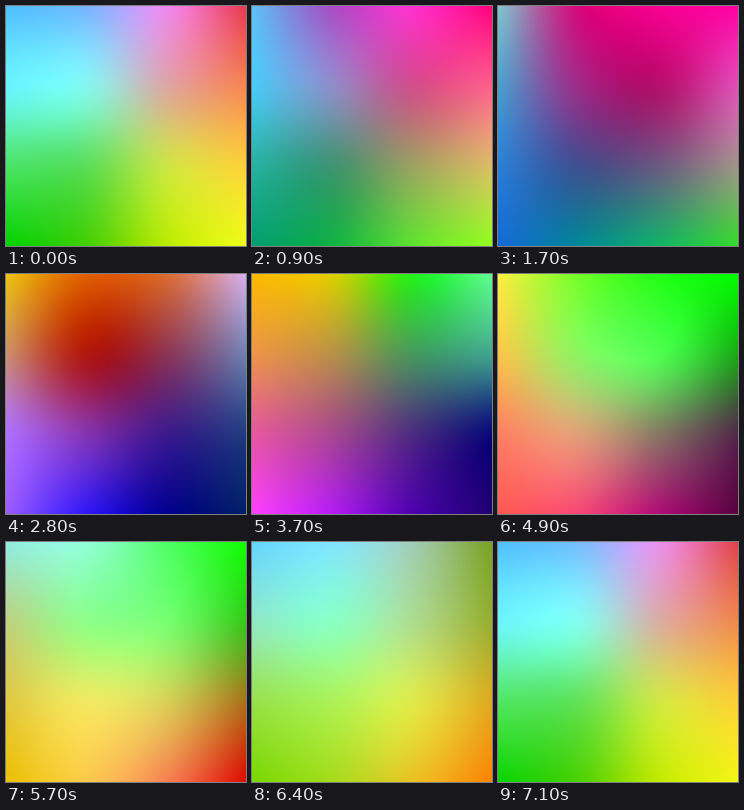
An HTML page with a canvas for the animation above (7.2 s loop, 300 px wide and 300 px high).

```html
<!DOCTYPE html>
<html lang="en">
<head>
<meta charset="utf-8">
<title>Colour field</title>
<style>
html, body { margin: 0; width: 100%; height: 100%; overflow: hidden; }
canvas { display: block; width: 100vw; height: 100vh; }
</style>
</head>
<body>
<canvas id="field" width="300" height="300"></canvas>
<script>
const SIZE = 300, LOOP = 7200, STEP = 100, GRID = 4;

// Each pose is a 4 x 4 gradient mesh, row by row.
const poses = [
  [0, `4fbfff 78b4ff ee88f0 e8384e
       66f4ff 84f6ee dca8a4 f8854e
       48e468 5cde58 cce444 ffd038
       00d200 42cf00 b8ec00 f0ff18`],
  [1700, `80c8d0 d8087c f80092 ff00a4
          4aa0d0 9c2c88 b4106c e050b8
          2a80d8 405090 6a5a80 a09488
          1468d8 008898 10b468 34dc28`],
  [2800, `ecc40c e06000 dc6c30 d8b0f0
          cc9070 b01810 8c3454 7080b4
          b070ff 8434b0 3c1a8c 203c80
          9c5cff 3018f8 000090 002064`],
  [3700, `ffb800 dcd000 24f418 60ff90
          f09448 b89048 48985c 40a490
          e858a0 a84890 4c2c80 080878
          ff40ff b41cf4 5000b0 200070`],
  [4900, `fff040 74ff28 24ff14 00ff00
          ffc448 8cf460 50ff50 18a814
          ff8060 e0a078 887864 502848
          ff5850 f84474 b00c74 580040`],
  [5700, `90ece0 90ffd8 50ff68 10ff00
          c0d080 90ff88 78ff70 38c818
          e0c840 f0e860 d8d058 a87018
          ecc000 fcc848 f88050 e00800`]
].map(([time, mesh]) => ({
  time,
  mesh: mesh.trim().split(/\s+/).flatMap(hex =>
    [0, 2, 4].map(i => parseInt(hex.slice(i, i + 2), 16)))
}));

const clamp = v => Math.max(0, Math.min(255, v));

function hermite(a, b, slopeA, slopeB, u) {
  const u2 = u * u, u3 = u2 * u;
  return a * (2 * u3 - 3 * u2 + 1) + b * (3 * u2 - 2 * u3)
    + slopeA * (u3 - 2 * u2 + u) + slopeB * (u3 - u2);
}

// Pose by index, wrapping around the loop.
function poseAt(i) {
  const n = poses.length, lap = Math.floor(i / n);
  const { time, mesh } = poses[i - lap * n];
  return { time: time + lap * LOOP, mesh };
}

function meshAt(t) {
  let i = poses.length - 1;
  while (poses[i].time > t) i--;
  const [p, a, b, n] = [-1, 0, 1, 2].map(d => poseAt(i + d));
  const span = b.time - a.time, u = (t - a.time) / span;
  return a.mesh.map((v, k) => clamp(hermite(
    v, b.mesh[k],
    (b.mesh[k] - p.mesh[k]) / (b.time - p.time) * span,
    (n.mesh[k] - v) / (n.time - a.time) * span,
    u)));
}

// Spline weights of the four mesh lines for every pixel along one axis.
const weights = Array.from({ length: SIZE }, (_, px) => {
  const pos = (px + 0.5) / SIZE * (GRID - 1);
  const i = Math.min(GRID - 2, Math.floor(pos));
  return Array.from({ length: GRID }, (_, k) => {
    const at = j => j < 0 ? 2 * at(0) - at(1)
      : j >= GRID ? 2 * at(GRID - 1) - at(GRID - 2)
      : Number(j === k);
    return hermite(at(i), at(i + 1),
      (at(i + 1) - at(i - 1)) / 2, (at(i + 2) - at(i)) / 2, pos - i);
  });
});

const ctx = document.getElementById('field').getContext('2d');
const image = ctx.createImageData(SIZE, SIZE);

function draw(t) {
  const mesh = meshAt(t), rowLen = GRID * 3;
  let out = 0;
  for (let y = 0; y < SIZE; y++) {
    const wy = weights[y];
    const row = Array.from({ length: rowLen }, (_, k) =>
      wy.reduce((sum, w, j) => sum + w * mesh[j * rowLen + k], 0));
    for (let x = 0; x < SIZE; x++) {
      const w = weights[x];
      for (let c = 0; c < 3; c++) {
        image.data[out++] = w[0] * row[c] + w[1] * row[c + 3]
          + w[2] * row[c + 6] + w[3] * row[c + 9];
      }
      image.data[out++] = 255;
    }
  }
  ctx.putImageData(image, 0, 0);
}

const start = performance.now();
let shown = -1;

function tick() {
  const t = Math.floor((performance.now() - start) % LOOP / STEP) * STEP;
  if (t !== shown) draw(shown = t);
  requestAnimationFrame(tick);
}
tick();
</script>
</body>
</html>
```
